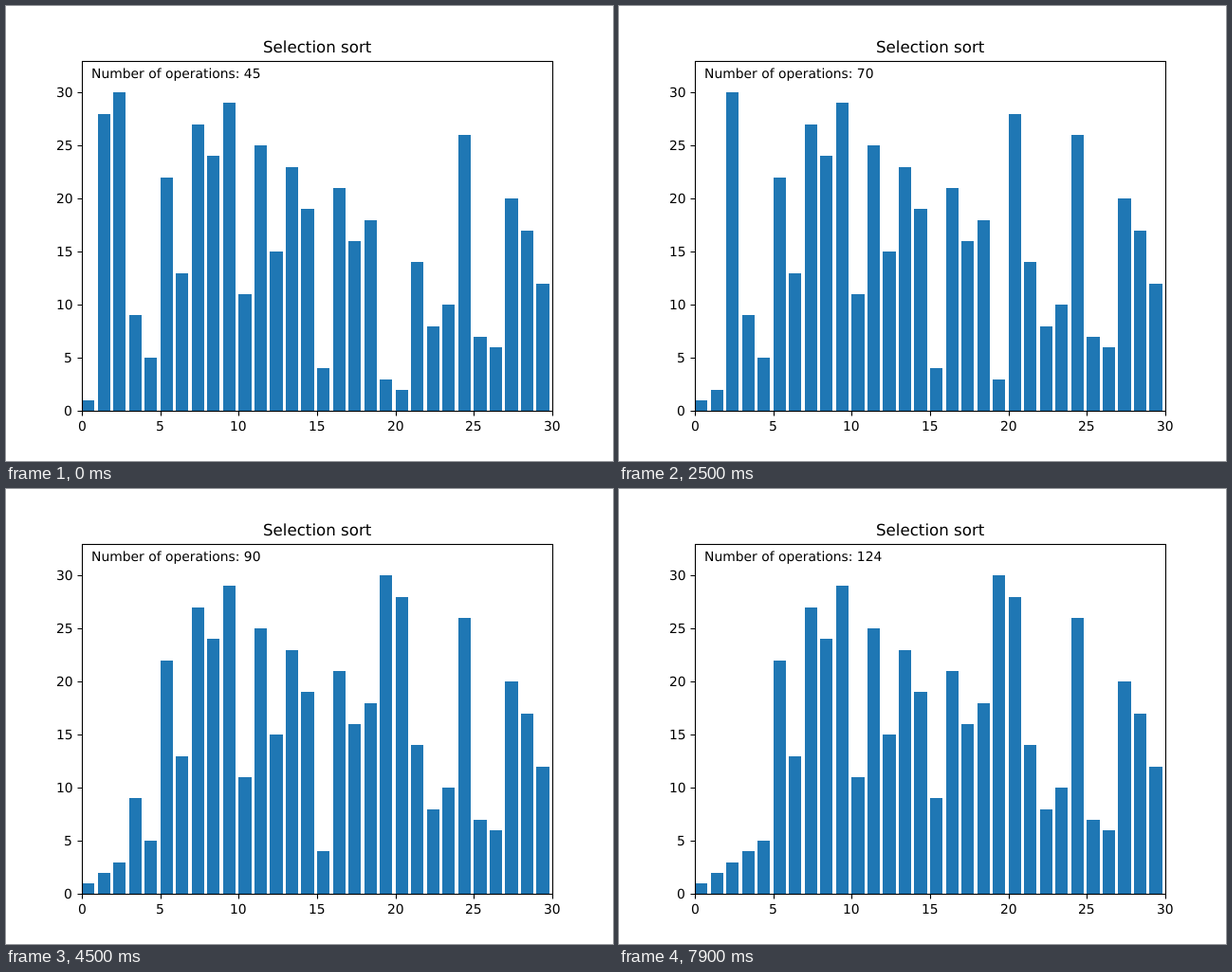
An HTML page that plays this animation: 640x480 px, repeating every 8000 ms.

```html
<!DOCTYPE html>
<html lang="en">
<head>
<meta charset="utf-8">
<title>Selection sort</title>
<style>
  html, body { margin: 0; width: 100%; height: 100%; overflow: hidden; background: #fff; }
  svg { display: block; width: 640px; height: 480px; }
  text { font: 13.889px "DejaVu Sans", sans-serif; text-rendering: geometricPrecision; }
  .title { font-size: 16.667px; }
  .bars { fill: #1f77b4; }
  .axes { fill: none; stroke: #000; stroke-width: 1.11; }
</style>
</head>
<body>
<svg viewBox="0 0 640 480">
  <g class="bars" id="bars"></g>
  <g class="axes" id="axes"><rect x="80.5" y="58.5" width="496" height="369"/></g>
  <g id="labels"></g>
  <text class="title" x="271" y="49">Selection sort</text>
  <text id="counter" x="90" y="76"></text>
</svg>
<script>
const STEP = 100, STEPS = 80, FIRST_COUNT = 45, PASSES_DONE = 1;
const LEFT = 80, BOTTOM = 427.2, UNIT_X = 496 / 30, UNIT_Y = 11.2, DIGIT = 8.837;
const values = [1, 28, 30, 9, 5, 22, 13, 27, 24, 29, 11, 25, 15, 23, 19,
                4, 21, 16, 18, 3, 2, 14, 8, 10, 26, 7, 6, 20, 17, 12];

const byId = id => document.getElementById(id);
const px = x => Math.round(LEFT + x * UNIT_X);
const py = y => Math.round(BOTTOM - y * UNIT_Y);

function add(parent, tag, attrs, text = "") {
  const el = document.createElementNS("http://www.w3.org/2000/svg", tag);
  for (const key in attrs) el.setAttribute(key, attrs[key]);
  el.textContent = text;
  return byId(parent).appendChild(el);
}

for (let v = 0; v <= 30; v += 5) {
  const width = String(v).length * DIGIT;
  add("axes", "path", { d: `M${px(v) + 0.5} 427.5v5M80.5 ${py(v) + 0.5}h-5` });
  add("labels", "text", { x: Math.round(LEFT + v * UNIT_X - width / 2), y: 448 }, v);
  add("labels", "text", { x: Math.round(70.28 - width), y: py(v) + 5 }, v);
}

const bars = values.map((v, i) =>
  add("bars", "rect", { x: px(i), width: px(i + 0.8) - px(i) }));

// Pass i makes n - i comparisons, then one swap.
function sortedAt(count) {
  const a = values.slice(), n = a.length;
  let total = 0;
  for (let i = 0; i < n; i++) {
    total += n - i + 1;
    if (total > count) break;
    if (i < PASSES_DONE) continue;
    const min = a.indexOf(Math.min(...a.slice(i)));
    [a[i], a[min]] = [a[min], a[i]];
  }
  return a;
}

let shown = -1;
function draw(time) {
  const step = Math.floor(time / STEP) % STEPS;
  if (step === shown) return;
  shown = step;
  const count = FIRST_COUNT + step;
  byId("counter").textContent = `Number of operations: ${count}`;
  sortedAt(count).forEach((v, i) => {
    bars[i].setAttribute("y", py(v));
    bars[i].setAttribute("height", py(0) - py(v));
  });
}

const start = performance.now();
function tick() {
  draw(performance.now() - start);
  requestAnimationFrame(tick);
}
tick();
</script>
</body>
</html>
```
